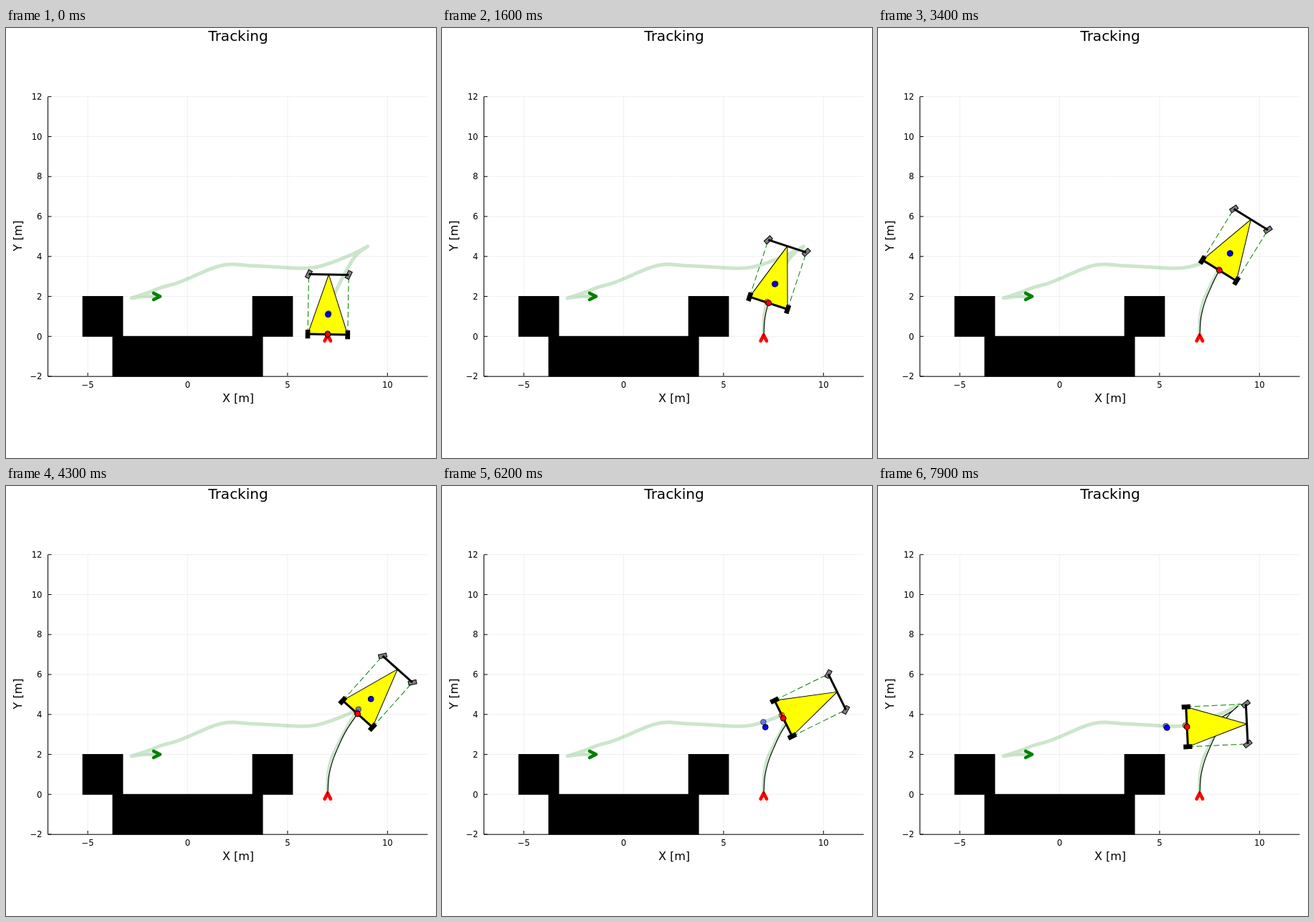
An HTML page with a canvas for the animation above (8000 ms loop, 600 by 600 pixels).

```html
<!DOCTYPE html>
<html lang="en">
<head>
<meta charset="utf-8">
<title>Tracking</title>
<style>
html, body { margin: 0; width: 100%; height: 100%; overflow: hidden; background: #fff; }
canvas { display: block; width: 600px; height: 600px; }
</style>
</head>
<body>
<canvas id="stage" width="600" height="600"></canvas>
<script>
const ctx = document.getElementById('stage').getContext('2d');
const LOOP = 8000, STEP = 100, SCALE = 27.88, RAD = Math.PI / 180;
const CUSP_TIME = 4.98;
const px = x => 253.5 + SCALE * x;
const py = y => 430.3 - SCALE * y;

// time [s], rear axle x, y [px], heading, steering [deg]
const POSES = [
  [0, 448.9, 427.6, 89, -25],
  [0.8, 450.4, 405.4, 81, -30],
  [1.6, 455.7, 383.8, 71.8, -29],
  [2.4, 463.9, 363.3, 65.4, -15],
  [3.2, 473.6, 343, 60.3, -22],
  [4.3, 490.6, 318, 48.2, -36],
  [4.6, 496.6, 312.2, 45.8, -33],
  [4.9, 501.8, 307.3, 43, -25],
  [5, 502.2, 306.9, 42.2, 5],
  [5.1, 501.3, 307.8, 41, 36],
  [5.4, 495.1, 313.4, 36.8, 36],
  [5.6, 490.7, 316.3, 34.1, 36],
  [6.3, 473.8, 325.4, 24.8, 35],
  [6.9, 458.3, 331.4, 16.5, 35],
  [7.9, 431.1, 336, 2.7, 36]
];
// time [s], lookahead along the route [m]
const LEAD = [[0, 1], [3.9, 1], [4.3, 1.2], [5.6, 0.98], [8, 0.98]];

function locate(rows, t) {
  let i = 0;
  while (i < rows.length - 2 && t > rows[i + 1][0]) i++;
  const h = rows[i + 1][0] - rows[i][0];
  return { i, h, k: (t - rows[i][0]) / h };
}

function linear(rows, t, col) {
  const { i, k } = locate(rows, t);
  return rows[i][col] + (rows[i + 1][col] - rows[i][col]) * k;
}

function smooth(rows, t, col) {
  const { i, h, k } = locate(rows, t);
  const slope = j => {
    const a = rows[Math.max(0, j - 1)], b = rows[Math.min(rows.length - 1, j + 1)];
    return (b[col] - a[col]) / (b[0] - a[0]);
  };
  const k2 = k * k, k3 = k2 * k;
  return (2 * k3 - 3 * k2 + 1) * rows[i][col] + (k3 - 2 * k2 + k) * h * slope(i)
    + (3 * k2 - 2 * k3) * rows[i + 1][col] + (k3 - k2) * h * slope(i + 1);
}

// Smooth curve through points, sampled as rows of [length, x, y].
function curve(points) {
  const rows = [];
  let length = 0;
  const keyed = points.map((p, i) => {
    if (i) length += Math.hypot(p[0] - points[i - 1][0], p[1] - points[i - 1][1]);
    return [length, ...p];
  });
  let run = 0;
  for (let i = 0; i <= 120; i++) {
    const s = length * i / 120;
    const x = smooth(keyed, s, 1), y = smooth(keyed, s, 2);
    if (i) run += Math.hypot(x - rows[i - 1][1], y - rows[i - 1][2]);
    rows.push([run, x, y]);
  }
  return rows;
}

const outward = curve([[448.8, 430.2], [449.3, 405], [453.5, 383], [462, 363.5],
  [472.5, 343], [484, 323], [492, 313.8], [504.5, 304.7]]);
const back = curve([[504.5, 304.7], [489.5, 312.8], [464.5, 323.5], [443, 331], [430, 334],
  [413, 335.3], [390, 334.3], [365, 332.8], [340, 331.6], [316, 329.8], [299, 331.8],
  [280, 338.4], [258, 348], [238, 356], [217, 362], [199, 369], [175, 377]]);
const parking = curve([[175, 377], [190, 375], [203, 374.4], [214, 374.4]]);

// Point on the route, u metres past the cusp.
function onRoute(u) {
  const leg = u < 0 ? outward : back;
  const s = u < 0 ? Math.max(0, outward[120][0] + u * SCALE) : u * SCALE;
  return [linear(leg, s, 1), linear(leg, s, 2)];
}

function line(points, color, width) {
  ctx.beginPath();
  points.forEach(p => ctx.lineTo(p[0], p[1]));
  ctx.strokeStyle = color;
  ctx.lineWidth = width;
  ctx.stroke();
}

function dot(p, color, alpha = 1) {
  ctx.globalAlpha = alpha;
  ctx.beginPath();
  ctx.arc(p[0], p[1], 3.9, 0, 2 * Math.PI);
  ctx.fillStyle = color;
  ctx.fill();
  ctx.strokeStyle = '#000';
  ctx.lineWidth = 1;
  ctx.stroke();
  ctx.globalAlpha = 1;
}

function text(str, x, y, size, align = 'center') {
  ctx.font = `${size}px "DejaVu Sans", sans-serif`;
  ctx.textAlign = align;
  ctx.fillStyle = '#000';
  ctx.fillText(str, x, y);
}

function drawAxes() {
  const label = v => String(v).replace('-', '\u2212');
  text('Tracking', 324, 18, 20);
  text('X [m]', 324, 522, 16);
  ctx.save();
  ctx.translate(22, 290);
  ctx.rotate(-Math.PI / 2);
  text('Y [m]', 0, 0, 16);
  ctx.restore();
  for (let x = -5; x <= 10; x += 5) {
    line([[px(x), 96], [px(x), 486]], '#efefef', 1);
    line([[px(x), 486], [px(x), 481]], '#000', 1);
    text(label(x), px(x), 502, 11.6);
  }
  for (let y = -2; y <= 12; y += 2) {
    line([[58.5, py(y)], [588, py(y)]], '#efefef', 1);
    line([[58.5, py(y)], [63.5, py(y)]], '#000', 1);
    text(label(y), 50.5, py(y) + 4.2, 11.6, 'right');
  }
  line([[58.5, 96], [58.5, 486.2], [588.5, 486.2]], '#000', 1);
}

function drawBox(x0, y0, x1, y1) {
  ctx.fillStyle = '#000';
  ctx.fillRect(px(x0) - 0.5, py(y1) - 0.5, px(x1) - px(x0) + 1, py(y0) - py(y1) + 1);
}

function drawWheel(x, y, turn, color) {
  ctx.save();
  ctx.translate(x, y);
  ctx.rotate(-turn);
  ctx.beginPath();
  ctx.rect(-5.6, -2.8, 11.2, 5.6);
  ctx.fillStyle = color;
  ctx.fill();
  ctx.strokeStyle = '#000';
  ctx.lineWidth = 1;
  ctx.stroke();
  ctx.restore();
}

// Local axes: x points forward, y to the right.
function drawCar(x, y, heading, steering) {
  const base = 3 * SCALE, half = SCALE;
  ctx.save();
  ctx.translate(x, y);
  ctx.rotate(-heading);
  ctx.beginPath();
  ctx.moveTo(0, -half);
  ctx.lineTo(base, 0);
  ctx.lineTo(0, half);
  ctx.closePath();
  ctx.fillStyle = '#ff0';
  ctx.fill();
  ctx.strokeStyle = '#000';
  ctx.lineWidth = 1;
  ctx.stroke();
  ctx.setLineDash([8, 4]);
  for (const side of [-half, half]) line([[0, side], [base, side]], '#008000', 1);
  ctx.setLineDash([]);
  for (const side of [-half, half]) {
    drawWheel(0, side, 0, '#000');
    drawWheel(base, side, steering, '#808080');
  }
  for (const axle of [0, base]) line([[axle, -half], [axle, half]], '#000', 3);
  ctx.restore();
}

function draw(t) {
  const pose = s => [smooth(POSES, s, 1), smooth(POSES, s, 2)];
  const [x, y] = pose(t);
  const heading = smooth(POSES, t, 3) * RAD;
  const steering = linear(POSES, t, 4) * RAD;
  const ahead = t < 4.95 ? SCALE : -SCALE;
  const u = t - CUSP_TIME;

  ctx.fillStyle = '#fff';
  ctx.fillRect(0, 0, 600, 600);
  drawAxes();

  ctx.save();
  ctx.beginPath();
  ctx.rect(58, 96, 530.5, 391);
  ctx.clip();
  drawBox(-5.25, 0, -3.25, 2);
  drawBox(3.25, 0, 5.25, 2);
  drawBox(-3.75, -2, 3.75, 0);

  ctx.lineCap = ctx.lineJoin = 'round';
  line([...outward, ...back, ...parking].map(r => [r[1], r[2]]), 'rgba(0,128,0,0.2)', 5);
  line([[206, 370], [215, 374.5], [206, 379]], '#008000', 4.6);
  line([[444.6, 436.6], [448.8, 428.6], [453, 436.6]], '#f00', 4.6);
  ctx.lineCap = 'butt';

  const trail = [[448.8, 430.3]];
  for (let s = 0; s < t; s += 0.1) trail.push(pose(s));
  trail.push([x, y]);
  line(trail, '#000', 1.1);
  ctx.lineJoin = 'miter';

  drawCar(x, y, heading, steering);
  dot(onRoute(u), '#f00', 0.5);
  dot(onRoute(u + linear(LEAD, t, 1)), '#00f', 0.5);
  dot([x, y], '#f00');
  dot([x + ahead * Math.cos(heading), y - ahead * Math.sin(heading)], '#00f');
  ctx.restore();
}

const start = performance.now();
function tick() {
  const ms = (performance.now() - start) % LOOP;
  draw(Math.floor(ms / STEP) * STEP / 1000);
  requestAnimationFrame(tick);
}
tick();
</script>
</body>
</html>
```
